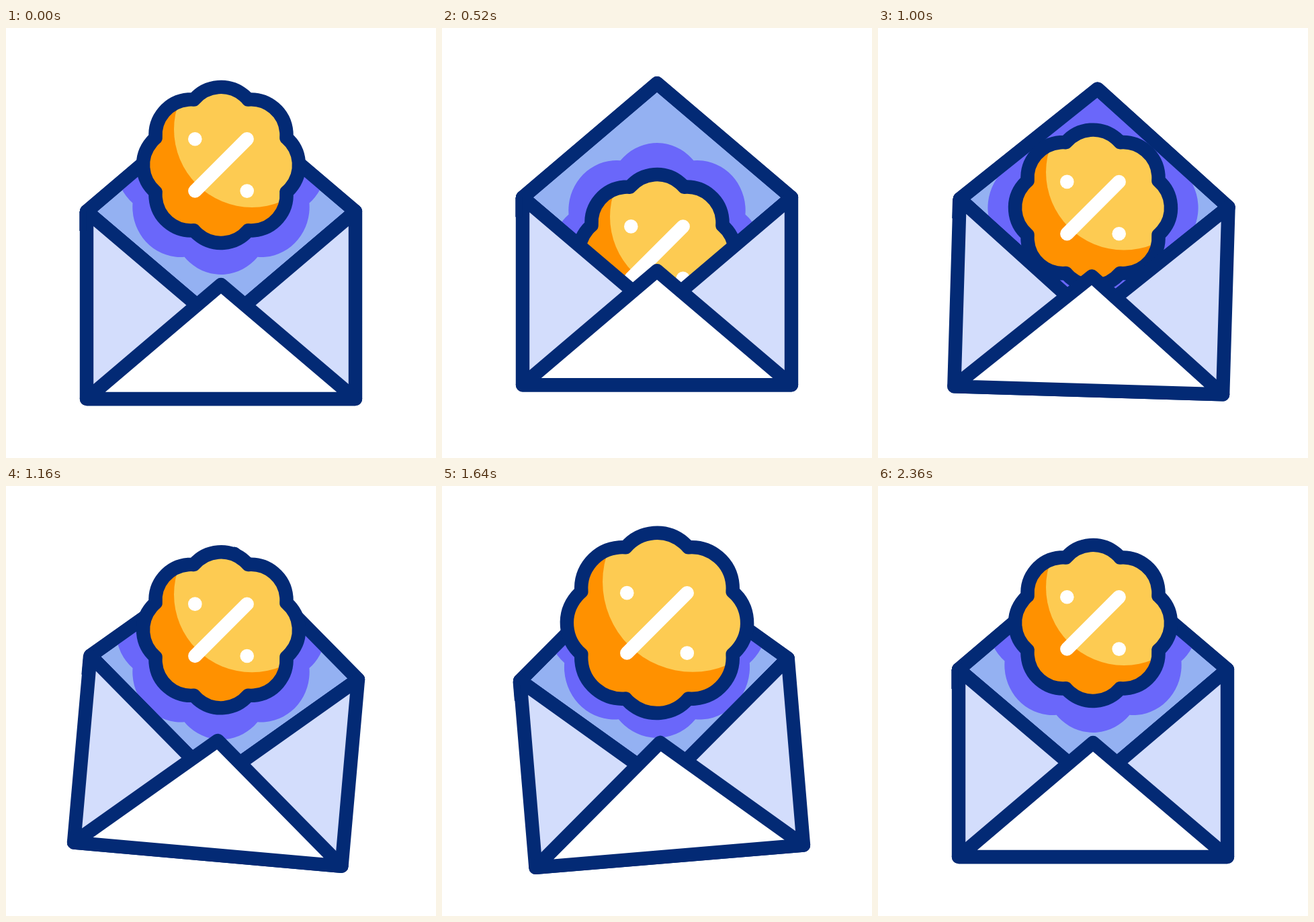
Recreate the animation shown at these times as an HTML page with a canvas. Size 640 px wide and 640 px high, loop 2.4 s.

```html
<!DOCTYPE html>
<html lang="en">
<head>
<meta charset="utf-8">
<title>Discount letter</title>
<style>
  html, body { margin: 0; width: 100%; height: 100%; overflow: hidden; background: #fff; }
  canvas { display: block; width: 640px; height: 640px; }
</style>
</head>
<body>
<canvas id="stage" width="640" height="640"></canvas>
<script>
const ctx = document.getElementById('stage').getContext('2d');
const LOOP = 2400, STEP = 40, CENTER_X = 320, PIVOT_Y = 327.5;
const NAVY = '#032a75', BLUE = '#94b1f2', LAVENDER = '#d3ddfc',
      VIOLET = '#6a67fa', ORANGE = '#ff9100', YELLOW = '#fdcb52', WHITE = '#fff';

// Eased 0..1 progress between two times
function ease(t, from, to) {
  const p = Math.min(1, Math.max(0, (t - from) / (to - from)));
  return p * p * (3 - 2 * p);
}

function pose(t) {
  return {
    lift: -25 * (ease(t, 70, 680) - ease(t, 720, 1280)),
    tilt: 6.4 * (ease(t, 850, 1290) - 2 * ease(t, 1290, 1740) + ease(t, 1780, 2310)) * Math.PI / 180,
    badgeY: 203.9 + 156 * (ease(t, 60, 680) - ease(t, 680, 1250)),
    swell: 0.16 * (ease(t, 1240, 1680) - ease(t, 1680, 2080))
  };
}

function polygon(points) {
  const path = new Path2D();
  points.forEach(([x, y]) => path.lineTo(x, y));
  path.closePath();
  return path;
}

const flap = polygon([[120, 273], [320, 103], [520, 273], [320, 443]]);
const body = polygon([[120, 273], [320, 443], [520, 273], [520, 552], [120, 552]]);
const front = polygon([[120, 552], [320, 382], [520, 552]]);

// Eight overlapping round lobes
function scallop(sx, sy) {
  const dist = 63, radius = 53, half = Math.PI / 8;
  const cusp = dist * Math.cos(half) + Math.sqrt(radius ** 2 - (dist * Math.sin(half)) ** 2);
  const spread = Math.atan2(cusp * Math.sin(half), cusp * Math.cos(half) - dist);
  const lobes = new Path2D(), path = new Path2D();
  for (let i = 0; i < 8; i++) {
    const a = i * Math.PI / 4;
    lobes.arc(dist * Math.cos(a), dist * Math.sin(a), radius, a - spread, a + spread);
  }
  lobes.closePath();
  path.addPath(lobes, new DOMMatrix([sx, 0, 0, sy, 0, 0]));
  return path;
}

function disc(x, y, r, color) {
  ctx.fillStyle = color;
  ctx.beginPath();
  ctx.arc(x, y, r, 0, Math.PI * 2);
  ctx.fill();
}

function paint(path, fill) {
  ctx.fillStyle = fill;
  ctx.fill(path);
  ctx.strokeStyle = NAVY;
  ctx.stroke(path);
}

function placeEnvelope({ lift, tilt }) {
  ctx.translate(CENTER_X, PIVOT_Y + lift);
  ctx.rotate(tilt);
  ctx.translate(-CENTER_X, -PIVOT_Y);
}

function drawFlap(p) {
  ctx.save();
  placeEnvelope(p);
  paint(flap, BLUE);
  ctx.clip(flap);
  ctx.setTransform(1, 0, 0, 1, CENTER_X, p.badgeY);
  const grow = 1 + 0.31 * p.swell;
  ctx.fillStyle = VIOLET;
  ctx.fill(scallop(1.35 * grow, 1.405 * grow));
  ctx.restore();

  ctx.save();
  placeEnvelope(p);
  ctx.strokeStyle = NAVY;
  ctx.stroke(flap);
  ctx.restore();
}

function drawBadge({ badgeY, swell }) {
  const s = 1 + swell, shape = scallop(s, s), d = 38.7 * s;
  ctx.save();
  ctx.translate(CENTER_X, badgeY);
  ctx.save();
  ctx.clip(shape);
  ctx.fillStyle = ORANGE;
  ctx.fillRect(-160, -160, 320, 320);
  disc(46 * s, -53 * s, 116 * s, YELLOW);
  ctx.restore();
  ctx.strokeStyle = NAVY;
  ctx.stroke(shape);

  ctx.strokeStyle = WHITE;
  ctx.beginPath();
  ctx.moveTo(-d, d);
  ctx.lineTo(d, -d);
  ctx.stroke();
  disc(-d, -d, 10.3, WHITE);
  disc(d, d, 10.3, WHITE);
  ctx.restore();
}

function drawFront(p) {
  ctx.save();
  placeEnvelope(p);
  paint(body, LAVENDER);
  ctx.fillStyle = NAVY;
  ctx.fillRect(109.3, 273, 10, 29);
  paint(front, WHITE);
  ctx.restore();
}

function draw(t) {
  const p = pose(t);
  ctx.fillStyle = WHITE;
  ctx.fillRect(0, 0, 640, 640);
  ctx.lineWidth = 20.4;
  ctx.lineJoin = ctx.lineCap = 'round';
  drawFlap(p);
  drawBadge(p);
  drawFront(p);
}

const start = performance.now();
function tick() {
  const t = (performance.now() - start) % LOOP;
  draw(Math.floor(t / STEP) * STEP);
  requestAnimationFrame(tick);
}
tick();
</script>
</body>
</html>
```
